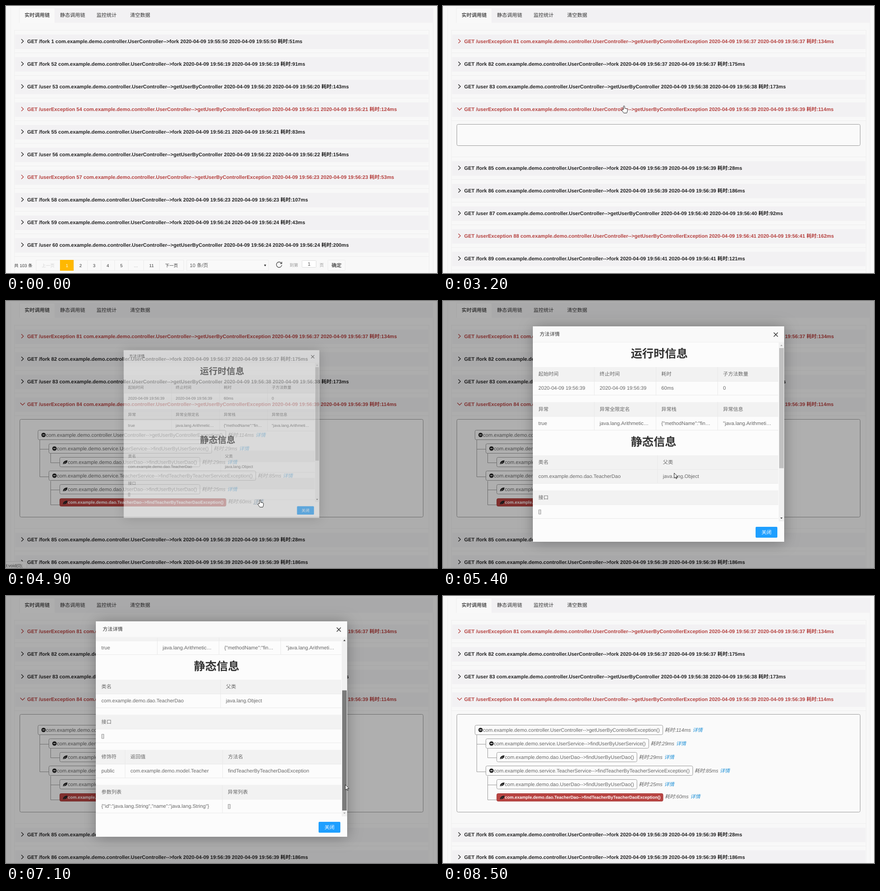
An HTML page that plays this animation: 950 by 590 pixels, repeating every 8800 ms.

```html
<!DOCTYPE html>
<html lang="zh-CN">
<head>
<meta charset="utf-8">
<title>调用链</title>
<style>
html, body { margin: 0; width: 100%; height: 100%; overflow: hidden; background: #f8f8f8; }
svg { display: block; width: 100%; height: 100%; }
text {
  font: 11.1px "Liberation Sans", "Noto Sans CJK SC", "Noto Sans CJK", sans-serif;
  fill: #333; white-space: pre; text-rendering: geometricPrecision;
}
.row { font-weight: bold; fill: #222; }
.bad { fill: #b5413f; }
.small { font-size: 9.54px; }
.mid { text-anchor: middle; }
.cell { fill: #666; }
.cost { font-style: italic; fill: #666; }
.link { font-style: italic; fill: #2493d8; }
.link.hot { fill: #23527c; text-decoration: underline; }
.badge { font-size: 9.42px; font-weight: bold; fill: #fff; }
.h1 { font-size: 25.1px; font-weight: bold; }
</style>
</head>
<body>
<svg id="stage" viewBox="0 0 950 590"></svg>
<script>
const LOOP = 8800, STEP = 100;
const PAGE_1 = `fork 1 55:50 51|fork 52 56:19 91|user 53 56:20 143|userException 54 56:21 124|fork 55 56:21 83
user 56 56:22 154|userException 57 56:23 53|fork 58 56:23 107|fork 59 56:24 43|user 60 56:24 200`.split(/[|\n]/);
const PAGE_4 = `userException 81 56:37 134|fork 82 56:37 175|user 83 56:38 173|userException 84 56:39 114|fork 85 56:39 28
fork 86 56:39 186|user 87 56:40 92|userException 88 56:41 162|fork 89 56:41 121|user 90 56:42 70`.split(/[|\n]/);
const METHODS = { fork: 'fork', user: 'getUserByController', userException: 'getUserByControllerException' };

const text = (x, y, s, cls = '', extra = '') => `<text x="${x}" y="${y}" class="${cls}" ${extra}>${s}</text>`;
const box = (x, y, w, h, fill, extra = '') => `<rect x="${x}" y="${y}" width="${w}" height="${h}" fill="${fill}" ${extra}/>`;
const path = (d, stroke, extra = '') => `<path d="${d}" fill="none" stroke="${stroke}" ${extra}/>`;
const group = (id, body, extra = '') => `<g id="${id}" ${extra}>${body}</g>`;

function row(entry, i, open) {
  const [kind, id, time, ms] = entry.split(' ');
  const y = 53 + 50 * i, bad = kind === 'userException';
  const stamp = `2020-04-09 19:${time}`;
  const label = `GET /${kind} ${id} com.example.demo.controller.UserController-->${METHODS[kind]} ${stamp} ${stamp} 耗时:${ms}ms`;
  const arrow = open ? `M31.5 ${y + 22}l5 5 5-5` : `M33.8 ${y + 20.2}l4.7 4.5-4.7 4.5`;
  return path(`M18 ${y + .5}H932`, '#eee') + box(20, y + 10, 911, 32, '#f2f1f3') +
    path(arrow, bad ? '#b5413f' : '#222', 'stroke-width="1.3"') +
    text(46.8, y + 28.6, label, bad ? 'row bad' : 'row');
}

function pager(page) {
  const edges = [66, 119, 149, 179, 209, 239, 269, 303, 338, 391];
  const labels = ['上一页', 1, 2, 3, 4, 5, '…', 11, '下一页'];
  const buttons = labels.map((label, i) => {
    const x = edges[i], w = edges[i + 1] - x, on = label === page;
    const fill = on ? '#ffb800' : label === 1 ? '#fff' : '#f9f9f9';
    const color = on ? '#fff' : i === 0 && page === 1 ? '#d2d2d2' : label === '…' ? '#999' : '#333';
    return box(x + .5, 561.5, w, 23, fill, `stroke="${on ? fill : '#ececec'}"`) +
      text(x + w / 2 + .3, 576.6, label, 'small mid', `style="fill:${color}"`);
  }).join('');
  const gray = 'style="fill:#999"';
  return path('M18 553.5H932', '#eee') + text(18, 576.6, '共 103 条', 'small') + buttons +
    box(398.5, 561.5, 180, 23, '#f9f9f9', 'stroke="#ececec"') + text(405, 577, '10 条/页', '', 'style="fill:#555"') +
    '<path d="M568.8 571.5h4.6l-2.3 4z" fill="#222"/>' +
    path('M607.2 568.6a6 6 0 1 0 .8 3.6M608 565.3v3.8h-3.8', '#333', 'stroke-width="1.1"') +
    text(625, 576.4, '到第', 'small', gray) + box(652.5, 562.5, 31, 15, '#fff', 'stroke="#ddd" rx="1"') +
    text(668, 573.6, page, 'mid', 'style="fill:#555"') + text(691, 576.4, '页', 'small', gray) +
    box(709.5, 561.5, 38, 23, '#f9f9f9', 'stroke="#ececec" rx="1"') + text(717.5, 577, '确定', '', 'style="fill:#111"');
}

// [left, right, middle, method, cost, link x]
const PKG = 'com.example.demo.';
const NODES = [
  [70.5, 484.5, 296, 'controller.UserController-->getUserByControllerException()', 114, 550],
  [94.5, 453.5, 326, 'service.UserService-->findUserByUserService()', 29, 513.5],
  [118.5, 427.5, 356, 'dao.UserDao-->findUserByUserDao()', 29, 487.5],
  [94.5, 550.5, 386, 'service.TeacherService-->findTeacherByTeacherServiceException()', 85, 610],
  [118.5, 427.5, 416, 'dao.UserDao-->findUserByUserDao()', 25, 487.5],
  [118.5, 485, 445, 'dao.TeacherDao-->findTeacherByTeacherDaoException()', 60, 545],
];
function node([l, r, y, name, cost, linkX], i) {
  const red = i === NODES.length - 1, textY = red ? y + 2.6 : y + 3.6;
  const frame = red ? box(l, y - 8.5, r - l, 17, '#b84442', 'rx="3" stroke="#a8403e"')
    : box(l, y - 10.5, r - l, 21, '#fbfbfb', 'rx="3" stroke="#999"');
  const icon = l > 100
    ? `<path d="M${l + 7} ${y + 4.5}q0-8 10-8.5-.5 8-7 8l-2.5.8z" fill="#222"/>` +
      path(`M${l + 7} ${y + 5}l6-5`, red ? '#b84442' : '#fff', 'stroke-width=".7"')
    : `<circle cx="${l + 12.3}" cy="${y}" r="4.8" fill="#222"/>` + path(`M${l + 9.8} ${y}h5`, '#fff', 'stroke-width="1.5"');
  const costY = red ? y + 2.2 : y + 3.6;
  return frame + icon + text(l + 17.8, textY, PKG + name, red ? 'badge' : 'cell') +
    text(r + 4, costY, `耗时:${cost}ms`, 'cost') + text(linkX, costY, '详情', 'link', red ? 'id="detail"' : '');
}
const tree = path('M74.5 307V388.5M74.5 327.5H94M74.5 388.5H94M98.5 337V357.5H118M98.5 398V450.5H118M98.5 417.5H118', '#999') +
  NODES.map(node).join('');

function table(y, cols, heads, cells) {
  const grid = cols.slice(1).map(x => `M${x + .5} ${y}v62`).join('');
  const line = (list, ty) => list.map((s, i) => text(cols[i] + 12.3, ty, s, 'cell')).join('');
  return box(198, y, 541, 31, '#f2f2f2') + path(`M198 ${y + 31.5}H739M198 ${y + 62}H739${grid}`, '#e9e9e9') +
    line(heads, y + 19.4) + line(cells, y + 50);
}
const QUARTERS = [198, 333, 469, 605];
const details = text(414, 124.5, '运行时信息', 'h1') + text(414, 319.5, '静态信息', 'h1') +
  '<rect id="hover" x="198" y="372" width="541" height="31" fill="#f2f2f2"/>' +
  table(146, QUARTERS, ['起始时间', '终止时间', '耗时', '子方法数量'], ['2020-04-09 19:56:39', '2020-04-09 19:56:39', '60ms', '0']) +
  table(223.5, QUARTERS, ['异常', '异常全限定名', '异常栈', '异常信息'],
    ['true', 'java.lang.Arithmetic…', '{"methodName":"fin…', '"java.lang.Arithmeti…']) +
  table(341, [198, 472.5], ['类名', '父类'], [PKG + 'dao.TeacherDao', 'java.lang.Object']) +
  table(418.5, [198], ['接口'], ['[]']) +
  table(496, [198, 262, 477], ['修饰符', '返回值', '方法名'], ['public', PKG + 'model.Teacher', 'findTeacherByTeacherDaoException']) +
  table(573.5, [198, 476.5], ['参数列表', '异常列表'], ['{"id":"java.lang.String","name":"java.lang.String"}', '[]']);

const dialog = box(198, 56, 554, 476, '#fcfcfc', 'filter="url(#shadow)"') +
  box(198, 56, 554, 35, '#f9f9f9') + path('M198 91H752', '#eee') + text(213, 77, '方法详情') +
  path('M729 69.7l9 9m0-9l-9 9', '#333', 'stroke-width="1.5"') +
  group('view', group('content', details), 'clip-path="url(#clip)"') +
  box(740, 92, 12, 395, '#f1f1f1') + '<rect id="thumb" x="741" y="104" width="10" height="265.5"/>' +
  '<path id="up" d="M743.5 99.5h5l-2.5-3z"/><path id="down" d="M743.5 478.5h5l-2.5 3z"/>' +
  box(689, 499, 48, 24, '#1e9fff', 'rx="2"') + text(702, 515, '关闭', '', 'style="fill:#fff"');

const rows = (list, from, to) => list.slice(from, to).map((r, i) => row(r, i + from)).join('');
document.getElementById('stage').innerHTML =
  `<defs><clipPath id="clip"><rect x="198" y="92" width="542" height="395"/></clipPath>
  <filter id="shadow" x="-20%" y="-20%" width="140%" height="140%"><feDropShadow dx="1" dy="1" stdDeviation="16" flood-opacity=".3"/></filter></defs>` +
  box(0, 0, 950, 590, '#f8f8f8') + path('M10.5 4V590M941.5 4V590M18.5 53V590M932.5 53V590', '#eee') +
  box(29, 4, 913, 33, '#f2f1f3') + box(29, 4, 78, 34, '#f9f9f9') + path('M29.5 37V4.5H107', '#eee') +
  text(41, 24.2, '实时调用链', '', 'style="fill:#000"') + text(119, 24.2, '静态调用链') +
  text(199.5, 24.2, '监控统计') + text(273.5, 24.2, '清空数据') +
  group('first', rows(PAGE_1, 0, 10) + pager(1)) +
  group('fourth', rows(PAGE_4, 0, 3) + group('closed', row(PAGE_4[3], 3)) +
    group('opened', row(PAGE_4[3], 3, true) + path('M18 253.5H932', '#eee') +
      '<rect id="panel" x="30.5" y="261.5" width="889" fill="#fafafa" stroke="#999" rx="3"/>' + group('tree', tree)) +
    group('lower', rows(PAGE_4, 4, 10) + pager(4))) +
  group('status', '<rect id="bubble" x="-5" y="575.5" height="20" fill="#f6f6f6" stroke="#ddd" rx="3"/>' +
    '<text id="address" x="0" y="588" class="small" style="fill:#555"></text>') +
  group('shade', box(0, 0, 950, 590, '#000', 'opacity=".3"')) +
  group('dialog', dialog) +
  group('cursor', '<path id="arrow" d="M0 0V11.5L2.7 9.2 4.4 13 6 12.3 4.4 8.6H8Z"/>' +
    '<path id="hand" d="M-1.4 8V1.2a1.4 1.4 0 0 1 2.8 0V5l5 1.2q1.4.5 1.3 2L7 13 6 15.5H-.5L-4.5 10q-1-1.6.6-2Z"/>',
    'fill="#fff" stroke="#111" stroke-width=".9"');

const el = id => document.getElementById(id);
const show = (id, on) => { el(id).style.display = on ? '' : 'none'; };
const set = (id, name, value) => el(id).setAttribute(name, value);
const clamp = v => Math.max(0, Math.min(1, v));

// [time, x, y, hand]
const MOVES = [
  [100, 626, 215, 0], [500, 420, 380, 0], [900, 161, 562, 1], [1100, 222, 566, 1], [1600, 222, 566, 1],
  [1800, 262, 562, 0], [2000, 276, 560, 0], [2300, 340, 420, 0], [2700, 399, 221, 1], [3500, 399, 221, 1],
  [4000, 430, 351, 0], [4600, 560, 440, 1], [4900, 560, 440, 1], [5000, 550, 428, 0], [5400, 509.5, 380, 0],
  [5700, 509.5, 380, 0], [6200, 747, 313, 0], [6500, 747, 313, 0], [7000, 748, 417, 0], [7300, 748, 417, 0],
  [7600, 713, 506, 1], [7800, 713, 506, 1], [7900, 764, 400, 0], [8200, 918, 84, 0], [8400, 940, 39, 0],
];
function pointer(t) {
  const i = Math.max(0, MOVES.findLastIndex(m => m[0] <= t));
  const a = MOVES[i], b = MOVES[i + 1] || a;
  const k = b === a ? 0 : (t - a[0]) / (b[0] - a[0]);
  return [a[1] + (b[1] - a[1]) * k, a[2] + (b[2] - a[2]) * k, a[3]];
}

function draw(t) {
  const expanded = t >= 3200, loaded = t >= 3400;
  show('first', t < 1300);
  show('fourth', t >= 1300);
  show('closed', !expanded);
  show('opened', expanded);
  show('tree', loaded);
  set('panel', 'height', loaded ? 216 : 47);
  set('lower', 'transform', `translate(0 ${loaded ? 249 : expanded ? 80 : 0})`);

  const pageLink = t >= 1100 && t <= 2000, detailLink = t >= 4600 && t < 5000;
  show('status', pageLink || detailLink);
  el('address').textContent = detailLink ? 't:void(0);' : 't:;';
  set('bubble', 'width', detailLink ? 51 : 22);
  el('detail').classList.toggle('hot', detailLink);

  const modal = t >= 4900 && t < 8000;
  const enter = 1 - (1 - clamp((t - 4800) / 300)) ** 2, leave = clamp((t - 7700) / 300);
  const scale = (.5 + .5 * enter) * (1 - .3 * leave);
  show('shade', modal);
  show('dialog', modal);
  set('dialog', 'opacity', enter * (1 - leave));
  set('dialog', 'transform', `translate(475 294) scale(${scale}) translate(-475 -294)`);
  const drag = clamp((t - 6400) / 600);
  set('content', 'transform', `translate(0 ${-156 * drag})`);
  set('thumb', 'y', 104 + 104.5 * drag);
  set('thumb', 'fill', t >= 6400 && t < 7300 ? '#7b7b7b' : t >= 6200 && t < 7400 ? '#a8a8a8' : '#c1c1c1');
  set('up', 'fill', drag > 0 ? '#333' : '#a3a3a3');
  set('down', 'fill', drag < 1 ? '#333' : '#a3a3a3');
  show('hover', t >= 5400 && t < 5900);

  const [x, y, hand] = pointer(t);
  show('cursor', t >= 100 && t < 8500);
  show('hand', hand);
  show('arrow', !hand);
  set('cursor', 'transform', `translate(${x} ${y})`);
}

const start = performance.now();
function tick() {
  const t = (performance.now() - start) % LOOP;
  draw(Math.floor(t / STEP) * STEP);
  requestAnimationFrame(tick);
}
tick();
</script>
</body>
</html>
```
